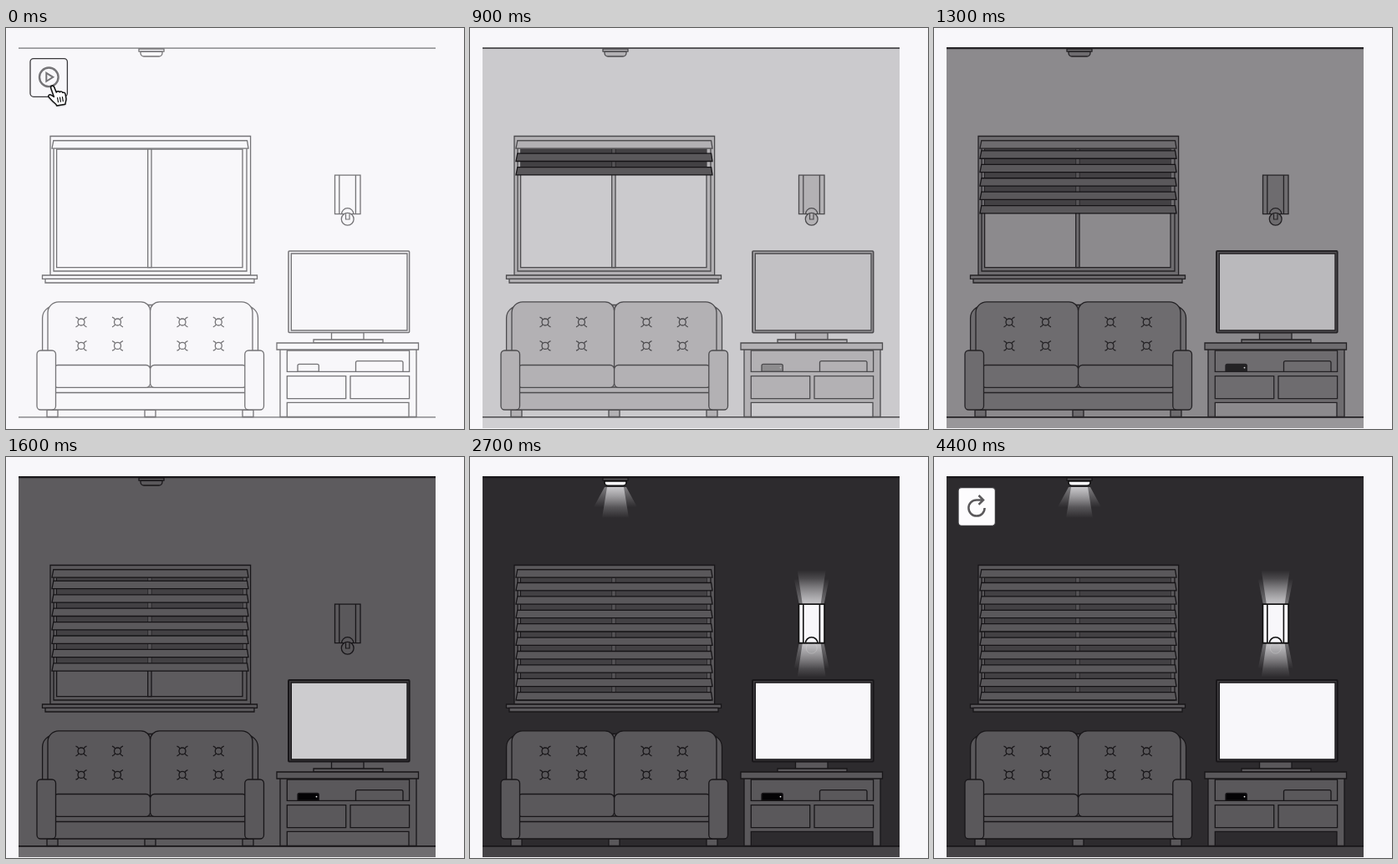
An HTML page with a canvas for the animation above (5.5 s loop, 548x480 px).

```html
<!DOCTYPE html>
<html lang="en">
<head>
<meta charset="utf-8">
<title>Room at dusk</title>
<style>
  html, body { margin: 0; width: 100%; height: 100%; overflow: hidden; background: #f8f7fa; }
  canvas { display: block; }
</style>
</head>
<body>
<canvas id="stage" width="548" height="480"></canvas>
<script>
const ctx = document.getElementById('stage').getContext('2d');
const LOOP = 5500, STEP = 100;
const PAPER = [248, 247, 250];

const clamp = v => Math.max(0, Math.min(1, v));
const mix = (a, b, k) => a + (b - a) * k;
const sine = u => (1 - Math.cos(Math.PI * u)) / 2;
const ramp = (t, from, to) => clamp((t - from) / (to - from));
const ease = (t, from, to) => sine(ramp(t, from, to));
const rgb = c => `rgb(${c.map(Math.round).join(',')})`;
const blend = (a, b, k) => rgb(a.map((v, i) => mix(v, b[i], k)));

function paint(fill, stroke, width = 1.3) {
  if (fill) { ctx.fillStyle = fill; ctx.fill(); }
  if (stroke) { ctx.strokeStyle = stroke; ctx.lineWidth = width; ctx.stroke(); }
}
function box(x1, y1, x2, y2, fill, stroke, radius = 0, width) {
  ctx.beginPath();
  ctx.roundRect(x1, y1, x2 - x1, y2 - y1, radius);
  paint(fill, stroke, width);
}
function poly(points, fill, stroke, width, open) {
  ctx.beginPath();
  points.forEach(([x, y]) => ctx.lineTo(x, y));
  if (!open) ctx.closePath();
  paint(fill, stroke, width);
}
const line = (x1, y1, x2, y2, stroke, width) =>
  poly([[x1, y1], [x2, y2]], null, stroke, width, true);
function circle(x, y, r, fill, stroke, width) {
  ctx.beginPath();
  ctx.arc(x, y, r, 0, Math.PI * 2);
  paint(fill, stroke, width);
}

// A cone of light, brightest at y1 and gone at y2
function beam(cx, y1, half1, y2, half2, alpha) {
  const g = ctx.createLinearGradient(0, y1, 0, y2);
  g.addColorStop(0, `rgba(248,247,250,${alpha})`);
  g.addColorStop(1, 'rgba(248,247,250,0)');
  poly([[cx - half1, y1], [cx + half1, y1], [cx + half2, y2], [cx - half2, y2]], g);
}

function palette(t) {
  const dusk = ease(t, 300, 2220);
  const shade = ease(t, 300, 1600);
  return {
    dusk, shade,
    glow: ease(t, 2150, 2700),
    wall: blend(PAPER, [45, 43, 46], dusk),
    floor: blend(PAPER, [69, 67, 70], dusk),
    body: blend(PAPER, [90, 88, 91], shade),
    ink: blend([117, 116, 119], [24, 22, 25], shade),
    gadget: blend(PAPER, [4, 3, 5], shade)
  };
}

function screenColor(t) {
  const keys = [[300, 248], [700, 214], [1100, 174], [1600, 205], [2100, 245], [2300, 248]];
  let v = 248;
  for (let i = 1; i < keys.length; i++) {
    const [a, from] = keys[i - 1], [b, to] = keys[i];
    if (t >= a && t < b) v = mix(from, to, (t - a) / (b - a));
  }
  return rgb([v, v - 1, v + 2]);
}

function drawRoom(p) {
  ctx.fillStyle = p.wall;
  ctx.fillRect(15, 23, 499, 456);
  ctx.fillStyle = p.floor;
  ctx.fillRect(15, 466, 499, 13);
  line(15, 24.2, 514, 24.2, p.ink, mix(1.3, 2.3, p.shade));
  line(15, 465.8, 514, 465.8, p.ink, mix(1.3, 1.8, p.shade));
}

function drawCeilingLamp(p) {
  const { glow } = p;
  if (glow) {
    beam(174, 36, 13, 60, 26, 0.4 * glow);
    beam(174, 36, 10, 73, 16, 0.6 * glow);
  }
  box(159, 25, 189, 28.2, p.body, p.ink);
  box(161, 28.4, 187, 34, p.body, p.ink, [0, 0, 4, 4]);
  if (glow) {
    ctx.globalAlpha = glow;
    box(161, 29, 187, 34.2, '#f8f7fa', '#111', [1, 1, 4, 4], 1.5);
    ctx.globalAlpha = 1;
  }
}

function drawWallLamp(p) {
  const { glow } = p;
  const x = 408.7;
  const fixture = (fill, ink, width) => {
    box(393.5, 176.2, 424, 222.6, fill, ink, 0, width);
    line(398.8, 176, 398.8, 222.6, ink, width);
    line(418.4, 176, 418.4, 222.6, ink, width);
    ctx.beginPath();
    ctx.arc(x, 223, 7.3, Math.PI, 0);
    paint(null, ink, width);
  };
  fixture(p.body, p.ink, 1.3);
  ctx.globalAlpha = 1 - glow;
  circle(x, 228.7, 7.4, p.body, p.ink);
  poly([[406.5, 222.6], [406.5, 229], [411, 229], [411, 222.6]], null, p.ink, 1.2, true);
  ctx.globalAlpha = 1;
  if (!glow) return;
  for (const [y, dir] of [[175.5, -1], [223.5, 1]]) {
    beam(x, y, 15, y + dir * 30, 21, 0.35 * glow);
    beam(x, y, 11, y + dir * 40, 17, 0.6 * glow);
  }
  ctx.globalAlpha = 0.3 * glow;
  circle(x, 228.7, 6.5, null, '#ddd', 1);
  ctx.globalAlpha = glow;
  fixture('#f8f7fa', '#111', 1.6);
  ctx.globalAlpha = 1;
}

function slat(bottom, fill, ink) {
  poly([[56.8, bottom - 9.3], [288.6, bottom - 9.3], [290, bottom], [55, bottom]], fill, ink, 1.3);
}

function drawWindow(p) {
  box(53, 129.5, 292.6, 296, p.body, p.ink);
  box(57, 135, 288, 291, p.body, p.ink);
  box(60.6, 145, 283, 286.7, p.wall, p.ink);
  box(169.7, 145, 174, 286.7, p.body, p.ink);

  const drop = mix(143, 291, p.dusk);
  if (p.dusk > 0) {
    ctx.save();
    ctx.beginPath();
    ctx.rect(50, 143.5, 245, 150);
    ctx.clip();
    const end = Math.min(drop - 5, 286.5);
    if (end > 145) {
      ctx.fillStyle = '#434144';
      ctx.fillRect(61, 145, 222, end - 145);
      ctx.fillStyle = '#565457';
      ctx.fillRect(170, 145, 4, end - 145);
      line(169.7, 145, 169.7, end, '#2b292c', 1);
      line(174.2, 145, 174.2, end, '#2b292c', 1);
    }
    for (let y = drop; y > 143.5; y -= 16.4) slat(y, '#5a585b', '#151316');
    ctx.restore();
  }
  slat(144.2, p.body, p.ink);
  box(43.5, 296, 300.5, 300.3, p.body, p.ink);
  box(47, 300.3, 297, 305, p.body, p.ink);
}

function tuft(x, y, ink) {
  circle(x, y, 4, null, ink);
  for (const sx of [-1, 1]) for (const sy of [-1, 1]) {
    ctx.beginPath();
    ctx.moveTo(x + sx * 2.8, y + sy * 2.8);
    ctx.quadraticCurveTo(x + sx * 4, y + sy * 5, x + sx * 6.5, y + sy * 5.8);
    paint(null, ink);
  }
}

function drawSofa(p) {
  const part = (x1, y1, x2, y2, r = 0) => box(x1, y1, x2, y2, p.body, p.ink, r);
  for (const x of [49, 166, 283]) part(x, 457, x + 13, 465.5);
  part(43.6, 333, 301.5, 440, [14, 14, 0, 0]);
  part(166, 331.5, 179, 345);
  part(50, 327.8, 172.6, 410, [13, 11, 0, 0]);
  part(172.6, 327.8, 295, 410, [11, 13, 0, 0]);
  part(55, 430, 290, 457);
  line(59, 436.5, 286, 436.5, p.ink);
  part(57, 403.5, 172.6, 430.3, 5);
  part(172.6, 403.5, 288, 430.3, 5);
  part(37, 386, 59.5, 457, 4.5);
  part(285.8, 386, 308.5, 457, 4.5);
  for (const x of [90, 133.5, 211, 254.3])
    for (const y of [352, 380.4]) tuft(x, y, p.ink);
}

function drawTelevision(p, t) {
  const part = (x1, y1, x2, y2, r) => box(x1, y1, x2, y2, p.body, p.ink, r);
  part(389.5, 364.5, 428, 373.5);
  part(368, 373, 451, 377);
  box(338, 267, 482.6, 364.6, blend(PAPER, [65, 63, 66], p.shade), p.ink, 1, mix(1.5, 2, p.shade));
  box(341.3, 270, 480, 362, screenColor(t), p.ink, 0, 1.4);

  part(328, 384, 491, 465.5);
  part(324, 377, 493.5, 385);
  part(336.3, 386, 482.6, 411.4);
  part(336.3, 416.6, 406.7, 443.7);
  part(412, 416.6, 482.6, 443.7);
  box(336.3, 448.4, 482, 465.5, p.wall, p.ink);
  part(418.5, 398.6, 475, 411.4, [2, 2, 0, 0]);
  box(349, 402.3, 374.3, 411.2, p.gadget, p.ink, [2, 2, 0, 0]);
  ctx.globalAlpha = p.shade;
  circle(371.5, 406.6, 0.9, '#f8f7fa');
  ctx.globalAlpha = 1;
}

function drawButton(t) {
  const play = t < 1000;
  const alpha = play ? 1 - ramp(t, 200, 600) : ramp(t, 3000, 3500);
  if (!alpha) return;
  ctx.globalAlpha = alpha;
  box(29, 36.6, 73.4, 82.3, play ? '#f8f7fa' : '#fdfcfe', '#39383b', 4, 1.3);
  if (play) {
    circle(51.3, 58.8, 11.3, null, '#757477', 2.4);
    poly([[48.3, 53.8], [56.3, 58.8], [48.3, 63.8]], null, '#757477', 2);
  } else {
    ctx.beginPath();
    ctx.arc(51, 61, 9.6, 0, Math.PI * 1.5);
    ctx.lineTo(58, 51.4);
    paint(null, '#5a585b', 2.5);
    poly([[53.5, 46], [59, 51.4], [53.5, 56.8]], null, '#5a585b', 2.5, true);
  }
  ctx.globalAlpha = 1;
}

function cursorPlace(t) {
  if (t < 100) return [50, 68];
  if (t < 900) {
    const k = ramp(t, 700, 800);
    return [mix(48, 4, k), mix(65, 60, k)];
  }
  if (t >= 3100 && t < 3900) {
    const k = ease(t, 3100, 3600);
    return [mix(0, 42, k), mix(436, 71, k)];
  }
  if (t >= 3900 && t < 4400) {
    const k = ease(t, 3800, 4400);
    return [mix(42, -24, k), mix(71, 20, k)];
  }
  return null;
}

function drawCursor(t) {
  const place = cursorPlace(t);
  if (!place) return;
  ctx.save();
  ctx.translate(...place);
  ctx.lineJoin = ctx.lineCap = 'round';
  const hand = new Path2D(
    'M3.8 4.2 C2.8 1.2 6.3 0 7.6 2.6 L10.2 9 C11.4 7.4 13.5 7.6 14.2 8.8 ' +
    'C15.4 7.6 17.3 8 17.9 9.4 C19.3 8.7 20.7 9.6 21 11.2 L22 16.6 ' +
    'C22.2 19 21 20.3 20.9 23.2 L10.8 25 C10.2 22.6 7.4 21.6 5.4 19.3 ' +
    'L1.2 14.8 C-.2 12.7 2 11 4.2 12.4 L7.4 14.4 Z');
  ctx.shadowColor = 'rgba(0,0,0,.4)';
  ctx.shadowBlur = 2;
  ctx.shadowOffsetY = 1;
  ctx.fillStyle = '#fff';
  ctx.fill(hand);
  ctx.shadowColor = 'transparent';
  ctx.strokeStyle = '#111';
  ctx.lineWidth = 1.5;
  ctx.stroke(hand);
  for (const i of [0, 1, 2])
    line(11.6 + i * 2.9, 15.6 - i * 0.5, 12.5 + i * 2.9, 20.6 - i * 0.5, '#111', 1.2);
  ctx.restore();
}

function draw(t) {
  ctx.fillStyle = rgb(PAPER);
  ctx.fillRect(0, 0, 548, 480);
  const p = palette(t);
  drawRoom(p);
  drawCeilingLamp(p);
  drawWindow(p);
  drawWallLamp(p);
  drawSofa(p);
  drawTelevision(p, t);
  drawButton(t);
  drawCursor(t);
}

const start = performance.now();
function tick() {
  const t = (performance.now() - start) % LOOP;
  draw(Math.floor(t / STEP) * STEP);
  requestAnimationFrame(tick);
}
tick();
</script>
</body>
</html>
```
